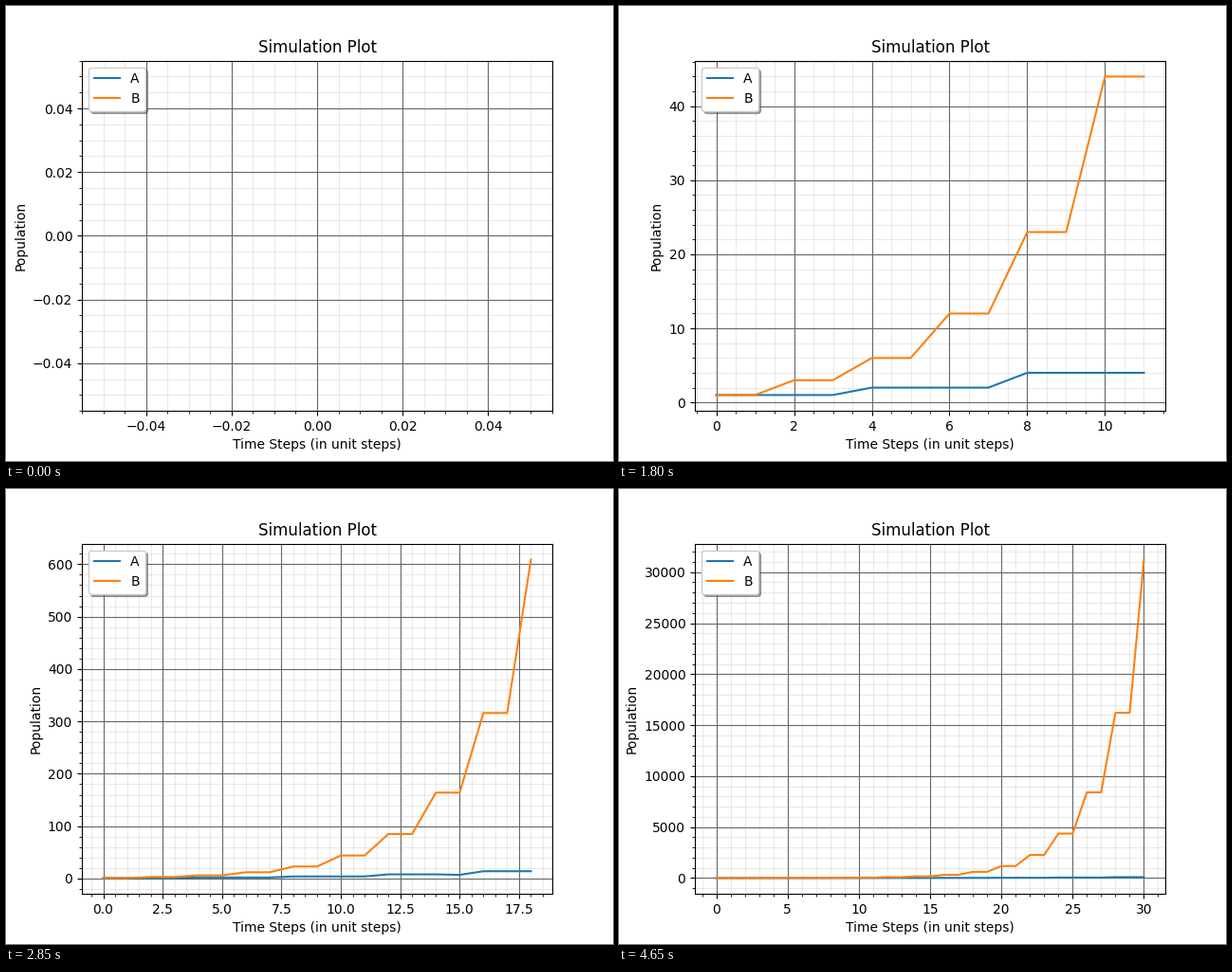
A matplotlib script that plays this animation: 640x480 px, repeating every 8000 ms.

```python
import matplotlib.pyplot as plt
from matplotlib.animation import FuncAnimation

STEPS = 31        # data points, one added every STEP_MS
STEP_MS = 150
TICK_MS = 50
LOOP_MS = 8000


def population_a():
    """Doubles every 4 steps; each generation dies after 15 steps."""
    size, born, series = 1, {0: 1}, []
    for t in range(STEPS):
        if t and t % 4 == 0:
            born[t] = size
            size *= 2
        size -= born.get(t - 15, 0)
        series.append(size)
    return series


def population_b():
    """Grows every 2 steps, nearly doubling each time."""
    sizes = [1, 3, 6, 12, 23, 44]
    while 2 * len(sizes) < STEPS:
        sizes.append(2 * sizes[-1] - sizes[-5])
    return [sizes[t // 2] for t in range(STEPS)]


series = [population_a(), population_b()]

fig, ax = plt.subplots(figsize=(6.4, 4.8), dpi=100)
lines = [ax.plot([], [], label=name)[0] for name in "AB"]
ax.set_title("Simulation Plot")
ax.set_xlabel("Time Steps (in unit steps)")
ax.set_ylabel("Population")
ax.legend(loc="upper left", shadow=True)
ax.minorticks_on()
ax.grid(which="major", color="#666666", linestyle="-")
ax.grid(which="minor", color="#999999", linestyle="-", alpha=0.2)


def update(frame):
    count = min(frame * TICK_MS // STEP_MS, STEPS)
    for line, values in zip(lines, series):
        line.set_data(range(count), values[:count])
    ax.relim()
    ax.autoscale_view()
    return lines


anim = FuncAnimation(fig, update, frames=LOOP_MS // TICK_MS,
                     init_func=lambda: update(0), interval=TICK_MS,
                     repeat=True, repeat_delay=0)
plt.show()
```
